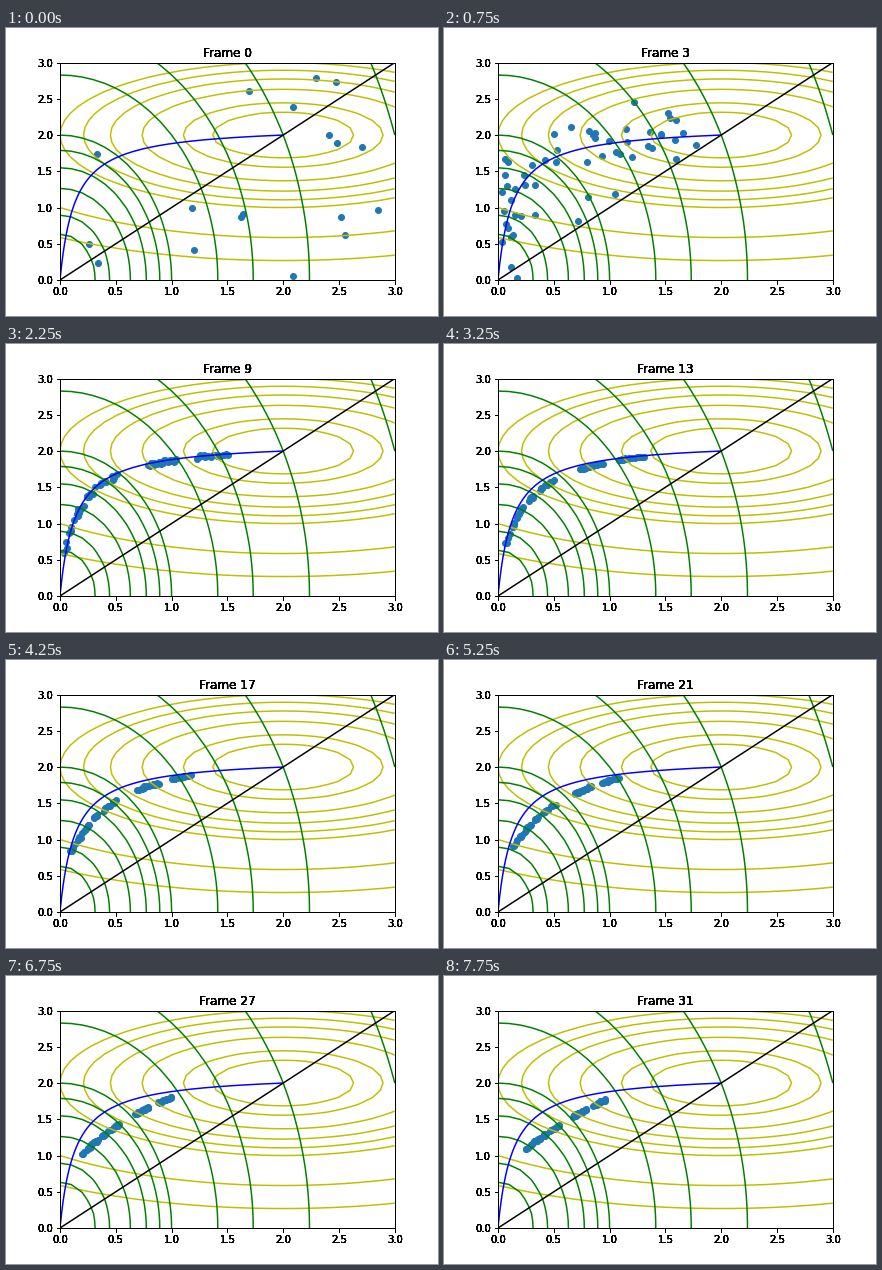
A matplotlib script that plays this animation: 432 by 288 pixels, repeating every 8 s.

```python
import numpy as np
import matplotlib.pyplot as plt
from matplotlib.animation import FuncAnimation

FRAMES, INTERVAL = 32, 250
COUNT = 75
SETTLED = 5       # generation at which the swarm has found the front
LABEL_LAYERS = 8  # stacked copies that give the labels their heavy edges

START = np.array([
    (1.69, 2.61), (2.29, 2.79), (2.47, 2.73), (2.09, 2.39), (2.41, 2.00), (2.48, 1.89),
    (2.71, 1.84), (.33, 1.74), (1.18, 1.00), (1.62, .87), (1.64, .91), (2.52, .87),
    (2.85, .97), (2.55, .62), (1.20, .41), (.26, .50), (.34, .23), (2.09, .05)])

# Each member keeps its rank along the front, with two gaps between the groups.
ranks = np.random.default_rng(3).uniform(0, 1, COUNT)
ranks[:2] = 0, 1
RANKS = np.interp(ranks, [0, .56, .56, .76, .76, 1], [0, .46, .60, .75, .85, 1])


def front(u, t):
    """Points at ranks u on the shrinking, flattening hyperbola, t generations on."""
    x_low, x_high = 0.02 + 0.0055 * t + 0.00013 * t**2, 0.9 + 0.9 * np.exp(-t / 10)
    y_low, y_high = 0.28 + 0.158 * np.sqrt(t), 1.99 - 0.0085 * t
    bend = 11.6 * np.exp(-t / 7.5)
    u = u ** (1 + 0.55 * np.exp(-t / 8))
    v = u * (1 + bend) / (1 + bend * u)
    return np.column_stack([x_low + (x_high - x_low) * u, y_low + (y_high - y_low) * v])


def population(k):
    if k == 0:
        return START
    rng = np.random.default_rng(40 + k)
    t = k - SETTLED
    # Heavy tails leave a few strays that die out with the generations.
    strays = rng.standard_t(2, (COUNT, 2)).clip(-4, 4) * [0.04, 0.065] * np.exp(-t / 2)
    jitter = rng.normal(0, 0.006, (COUNT, 2))
    points = np.abs(front(RANKS, max(t, 0)) + strays + jitter)
    return points[:25 + 10 * k]


fig = plt.figure(figsize=(6, 4), dpi=72, facecolor="white")
box = [0.125, 0.125, 0.775, 0.755]
ax = fig.add_axes(box)

grid = np.linspace(0, 3, 31)
X, Y = np.meshgrid(grid, grid)
levels = [0.1, 0.2, 0.4, 0.6, 0.8, 1, 2, 3, 5, 10]
ax.contour(X, Y, (X - 2)**2 / 4 + (Y - 2)**2, levels, colors="y", linewidths=1.5)
ax.contour(X, Y, X**2 + Y**2 / 4, levels, colors="g", linewidths=1.5)

w = np.linspace(0, 1, 300)
ax.plot(2 * (1 - w) / (1 + 3 * w), 8 * (1 - w) / (4 - 3 * w), "b")
ax.plot([0, 3], [0, 3], "k")
dots = ax.scatter(*START.T, color="C0")

layers = [ax] + [fig.add_axes(box, facecolor="none", label=f"layer {i}")
                 for i in range(1, LABEL_LAYERS)]
ticks = np.arange(0, 3.1, 0.5)
for layer in layers:
    layer.set(xlim=(0, 3), ylim=(0, 3), xticks=ticks, yticks=ticks)
titles = [layer.set_title("Frame 0") for layer in layers]


def draw(k):
    dots.set_offsets(population(k))
    for title in titles:
        title.set_text(f"Frame {k}")
    return [dots, *titles]


anim = FuncAnimation(fig, draw, frames=FRAMES, interval=INTERVAL, repeat=True)
plt.show()
```
